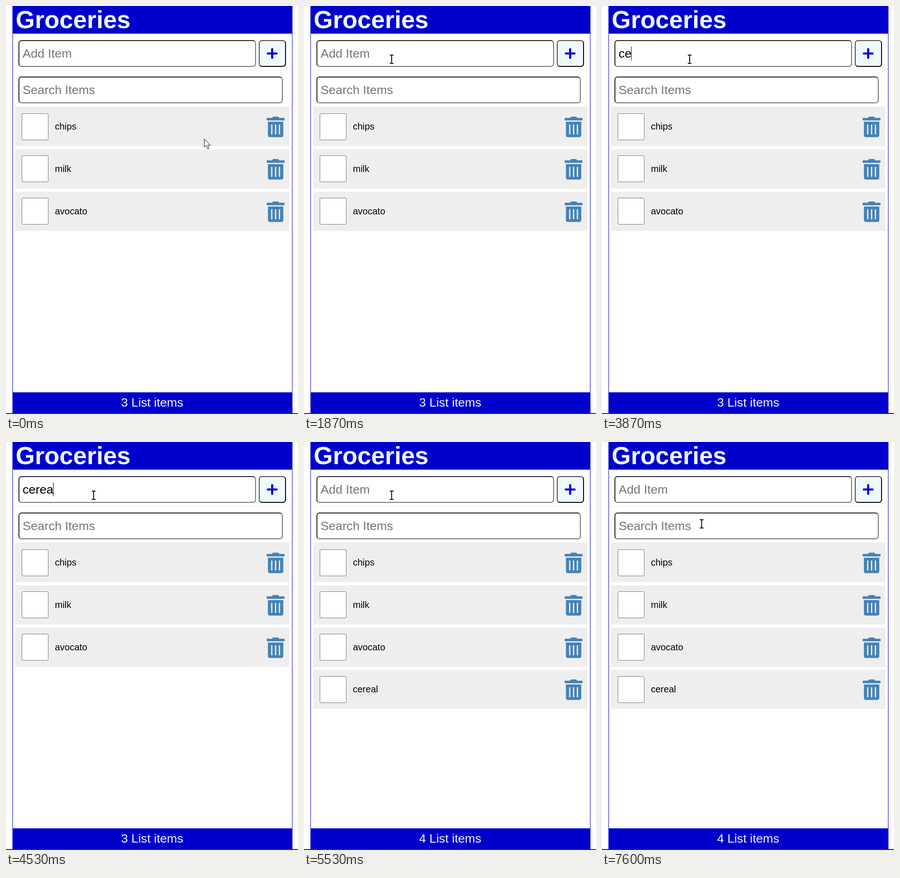
An HTML page for the animation above (8000 ms loop, 633 by 885 pixels).

```html
<!DOCTYPE html>
<html lang="en">
<head>
<meta charset="utf-8">
<title>Groceries</title>
<style>
html, body { margin: 0; width: 100%; height: 100%; overflow: hidden; background: #fff; }
svg { position: absolute; left: 0; top: 0; font: 26.67px "Liberation Sans", Arial, sans-serif; }
.box { position: absolute; top: 74px; height: 58px; box-sizing: border-box; border: 2px solid; border-radius: 6.67px; }
.field { left: 27px; border-color: #222 #767676 #767676 #222; }
.button { left: 548px; width: 59px; background: #f0f8ff; border-color: #4c4c4c #000 #000 #4c4c4c; }
.blue { fill: #0000cd; }
.light { fill: #f0f8ff; }
.hint { fill: #757575; }
</style>
</head>
<body>
<div class="box field" style="width:515px"></div>
<div class="box button"></div>
<div class="box field" style="width:573px;top:153px"></div>
<svg width="633" height="885" viewBox="0 0 633 885">
  <defs>
    <g id="trash" fill="#4682b4" transform="scale(.0868)">
      <path d="M432 32H312l-9.4-18.7A24 24 0 0 0 281 0H167a24 24 0 0 0-21.5 13.3L136 32H16A16 16 0 0 0 0 48v32a16 16 0 0 0 16 16h416a16 16 0 0 0 16-16V48a16 16 0 0 0-16-16z"/>
      <path d="M32 128H416V464a48 48 0 0 1-48 48H80a48 48 0 0 1-48-48z"/>
      <path d="M128 208V432M224 208V432M320 208V432" stroke="#eee" stroke-width="32" stroke-linecap="round"/>
    </g>
  </defs>
  <path class="blue" d="M14 0H621V60H14zM14 60h1V838h-1zM620 60h1V838h-1zM14 838H621V883H14z"/>
  <path fill="#eee" d="M15 139H620v1H15zM15 218H620v1H15z"/>
  <path fill="#333" d="M0 883H633v2H0z"/>
  <text class="light" x="21" y="48" font-size="53.33" font-weight="bold">Groceries</text>
  <path d="M567.5 103H586.5M577 93.5V112.5" stroke="#0000cd" stroke-width="4.6" stroke-linecap="round"/>
  <text id="entry" x="36" y="112"></text>
  <text class="hint" x="36" y="191">Search Items</text>
  <g id="list"></g>
  <text id="count" class="light" x="317" y="869" text-anchor="middle"></text>
  <rect id="caret" y="88" width="1" height="30"/>
  <path id="arrow" d="M0 .5V18.5L4.2 14.6L7.3 22L10.2 20.7L7.2 13.7H12.8z" fill="#fff" stroke="#000"/>
  <path id="beam" d="M-4-9H-1L0-8L1-9H4M0-8V8M-4 9H-1L0 8L1 9H4" fill="none" stroke="#000" stroke-width="1.8"/>
</svg>
<script>
const LOOP = 8000, TICK = 200 / 3;
const $ = id => document.getElementById(id);
const [entry, list, count, caret, arrow, beam] =
  ["entry", "list", "count", "caret", "arrow", "beam"].map($);

const word = "cereal";
const keyTimes = [3600, 3870, 4070, 4270, 4530, 4870];
const submitTime = 5530;
const caretSpans = [[1330, 1870], [2400, 2930], [3470, 5400], [5870, 6470], [7000, 7530]];

const easeOut = p => 1 - (1 - p) ** 1.5;
const smooth = p => p * p * (3 - 2 * p);
const linear = p => p;
const home = [430, 288];
const moves = [
  { start: 70, steps: 6, to: [182, 100], ease: easeOut },
  { start: 670, steps: 3, to: [187, 112], ease: linear },
  { start: 930, steps: 3, to: [190, 115.5], ease: linear },
  { start: 7070, steps: 9, to: [216, 177.5], ease: smooth }
];

list.innerHTML = ["chips", "milk", "avocato", word].map((name, i) => {
  const top = Math.ceil(218.9 + 91.67 * i), box = Math.floor(233 + 91.67 * i);
  return `<g><rect x="20" y="${top}" width="594" height="85" fill="#eee"/>
    <rect x="34.5" y="${box + .5}" width="57" height="57" rx="2.5" fill="#fff" stroke="#767676"/>
    <text x="106" y="${top + 49}" font-size="20">${name}</text>
    <use href="#trash" x="0" y="0" transform="translate(565 ${top + 21})"/></g>`;
}).join("");

function pointerAt(t) {
  let pos = home;
  for (const { start, steps, to, ease } of moves) {
    if (t < start) break;
    const k = Math.min(steps, Math.floor((t - start + 5) / TICK) + 1);
    const p = ease(k / steps), from = pos;
    pos = from.map((v, i) => v + (to[i] - v) * p);
  }
  return pos;
}

const show = (el, on) => el.setAttribute("visibility", on ? "visible" : "hidden");

function draw(t) {
  const added = t >= submitTime;
  const typed = added ? "" : word.slice(0, keyTimes.filter(k => t >= k).length);
  entry.textContent = typed || "Add Item";
  entry.setAttribute("class", typed ? "" : "hint");

  const width = typed ? entry.getComputedTextLength() : 0;
  caret.setAttribute("x", Math.max(36, Math.floor(35.7 + width)));
  show(caret, caretSpans.some(([on, off]) => t >= on && t < off));

  show(list.lastElementChild, added);
  count.textContent = `${added ? 4 : 3} List items`;

  const [x, y] = pointerAt(t);
  const overField = (y > 74 && y < 132) || (y > 153 && y < 211);
  for (const el of [arrow, beam]) el.setAttribute("transform", `translate(${Math.round(x)} ${Math.round(y * 2) / 2})`);
  show(arrow, !overField);
  show(beam, overField);
}

const begin = performance.now();
function frame() {
  draw((performance.now() - begin) % LOOP);
  requestAnimationFrame(frame);
}
frame();
</script>
</body>
</html>
```
